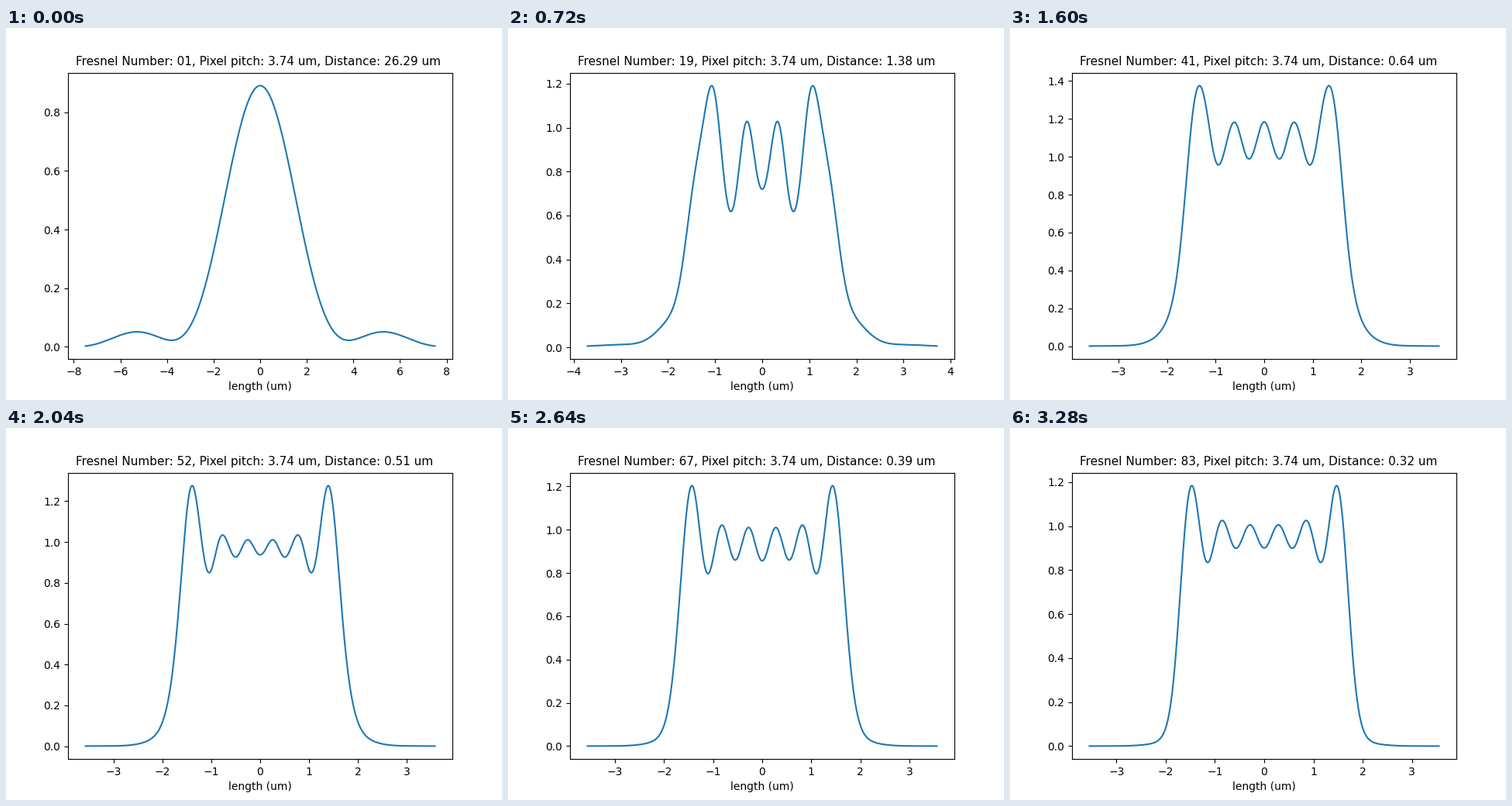
Write a matplotlib script that moves like this. It is 640 px wide and 480 px high and loops after 3.32 s.

```python
import numpy as np
import matplotlib.pyplot as plt
from matplotlib.animation import FuncAnimation

WAVELENGTH = 0.532  # all lengths in um
PITCH = 3.74
WINDOW = 7.0
K = 2 * np.pi / WAVELENGTH
STEPS = 83


def distance(number):
    return PITCH ** 2 / (WAVELENGTH * number)


def profile(number, points=601):
    """Rayleigh-Sommerfeld intensity behind a square pixel, along y = 0."""
    z = distance(number)
    half = WINDOW / 2 + 2 * WAVELENGTH * z / WINDOW
    edge = PITCH / 2

    # Integrate the kernel over the aperture height.
    u = np.linspace(0, half + edge, 1600)
    rows = 160
    v = (np.arange(rows) + 0.5) * edge / rows
    r = np.sqrt(u[:, None] ** 2 + v ** 2 + z ** 2)
    kernel = z / (2 * np.pi) * (1 / r - 1j * K) * np.exp(1j * K * r) / r ** 2
    strip = 2 * kernel.sum(axis=1) * edge / rows

    # The running integral is odd, so the width is a difference of two values.
    total = np.zeros(len(u), dtype=complex)
    total[1:] = np.cumsum((strip[1:] + strip[:-1]) / 2) * (u[1] - u[0])

    def running(x):
        return np.sign(x) * np.interp(np.abs(x), u, total)

    x = np.linspace(-half, half, points)
    field = running(x + edge) - running(x - edge)
    return x, np.abs(field) ** 2


profiles = [profile(n) for n in range(1, STEPS + 1)]

plt.rcParams["font.family"] = "DejaVu Sans"
fig, ax = plt.subplots(figsize=(6.4, 4.8), dpi=100)
line, = ax.plot([], [], color="#1f77b4", lw=1.5)
title = fig.text(0.14, 0.9, "", fontsize=11)
ax.set_xlabel("length (um)")


def update(i):
    line.set_data(*profiles[i])
    ax.relim()
    ax.autoscale_view()
    title.set_text(f"Fresnel Number: {i + 1:02d}, Pixel pitch: {PITCH:.2f} um, "
                   f"Distance: {distance(i + 1):.2f} um")
    return line, title


anim = FuncAnimation(fig, update, frames=STEPS, interval=40,
                     repeat=True, repeat_delay=0)
plt.show()
```
